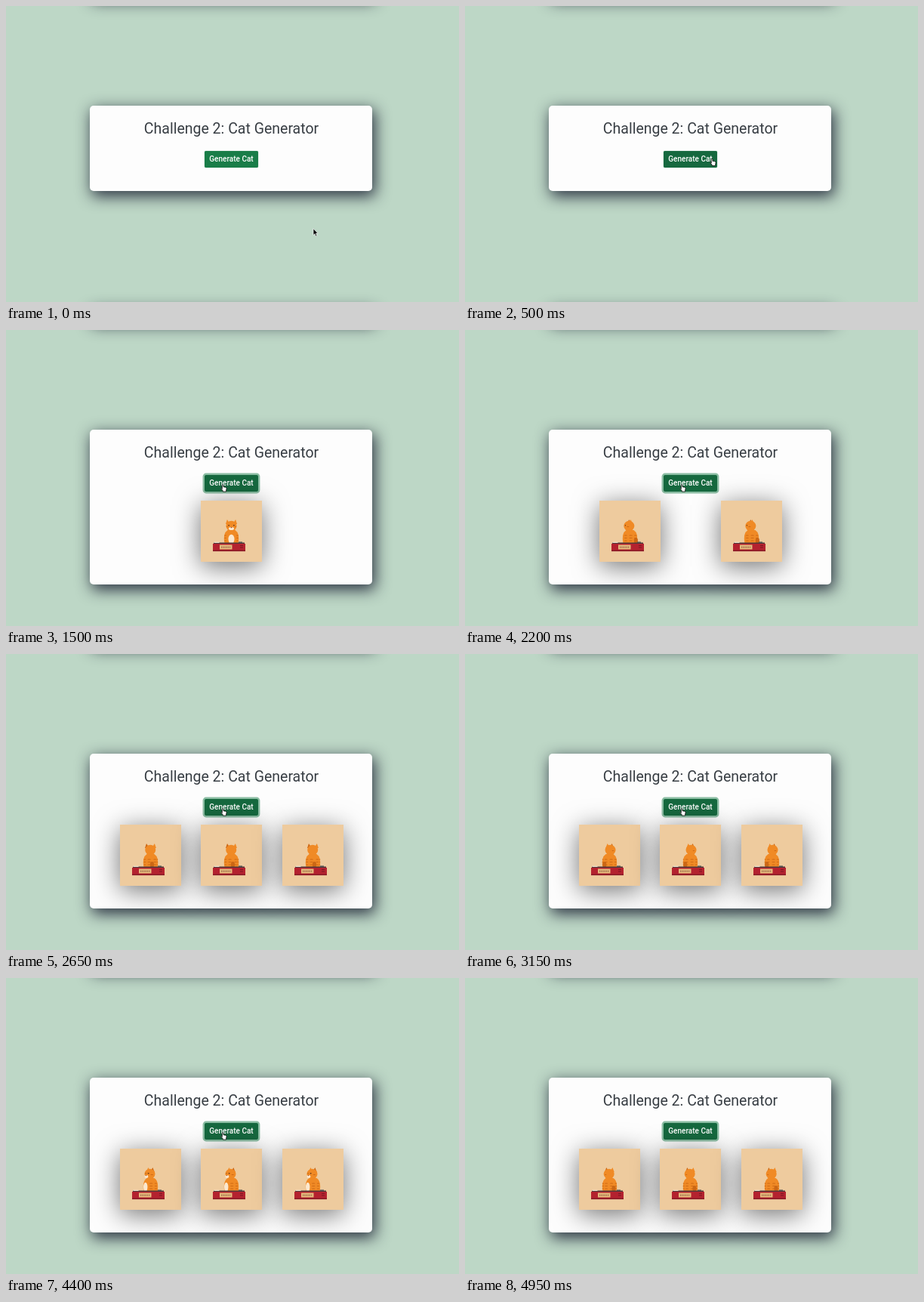
Animation, 600 px wide and 392 px high, one loop 5000 ms. Source, as an HTML page:

```html
<!DOCTYPE html>
<html lang="en">
<head>
<meta charset="utf-8">
<title>Cat Generator</title>
<style>
  html, body { margin: 0; width: 100%; height: 100%; overflow: hidden; background: #bdd7c6; }
  #stage { position: absolute; left: 0; top: 0; width: 600px; height: 392px; overflow: hidden; font-family: Roboto, sans-serif; }
  #stage > *, .tile { position: absolute; }
  .card { left: 111px; width: 374px; height: 113px; border-radius: 5px; background: #fdfdfd; box-shadow: 3px 6px 20px 1px rgba(34, 40, 58, .92); }
  #above { top: -126px; }
  #card { top: 132px; }
  #below { top: 398px; }
  #title { left: 111.5px; width: 374px; top: 151px; line-height: 24px; font-size: 19.5px; text-align: center; color: #383e44; white-space: nowrap; }
  #button { left: 263px; top: 192px; width: 71px; height: 22px; border-radius: 2px; background: #197d48; box-shadow: 0 0 1px #197d48; color: #fff; font-size: 10px; font-weight: 500; line-height: 22px; text-align: center; white-space: nowrap; }
  #button.hover { background: #16693f; }
  #button.focus { box-shadow: 0 0 0 2.4px #8bbda3; }
  .tile { top: 226px; width: 81px; height: 81px; background: #eecb9e; box-shadow: 0 6px 34px rgba(0, 0, 0, .55); }
  .tile svg { display: block; }
  #pointer { left: 0; top: 0; overflow: visible; }
</style>
</head>
<body>
<div id="stage">
  <div class="card" id="above"></div>
  <div class="card" id="below"></div>
  <div class="card" id="card"></div>
  <div id="title">Challenge 2: Cat Generator</div>
  <div id="button">Generate Cat</div>
  <div id="tiles"></div>
  <svg id="pointer" width="12" height="14">
    <path id="arrow" d="M.5 .3V9L2.5 7.2 3.9 10.4 5.4 9.7 4 6.6H6.7Z" fill="#000" stroke="#fff" stroke-width=".7"/>
    <path id="hand" d="M2.3 6.5V1.3Q3.2 0 4 1.3V4Q5 3.3 5.6 4.3 6.6 3.7 7 4.7 8.3 4.4 8.2 5.8L7.6 8.2V10H3.2V8.8L.6 6Q.8 4.8 2.3 6.5Z" fill="#fff" stroke="#111" stroke-width=".8"/>
  </svg>
</div>
<script>
const LOOP = 5000, FOCUS = 1350, HOVER = 350, TURN = 2500, FRONT = 1500;
const CLICKS = [1450, 1950, 2450];
const COLUMNS = [[], [258], [178, 339], [150.5, 258, 365.5]];
const ROUTE = [
  [0, 406.5, 294.5], [50, 406.5, 294.5], [400, 306, 206], [550, 330, 200], [800, 369, 167],
  [1050, 276, 205], [1150, 284, 204], [4500, 284, 204], [4850, 300, -20], [LOOP, 300, -20]
];
const ORANGE = '#f08a25', DARK = '#cb6715', CREAM = '#fbe8cf', MID = 40.5;
const $ = id => document.getElementById(id);

const oval = (x, y, rx, ry, fill) => `<ellipse cx="${x}" cy="${y}" rx="${rx}" ry="${ry}" fill="${fill}"/>`;
const box = (x, y, w, h, fill) => `<rect x="${x}" y="${y}" width="${w}" height="${h}" fill="${fill}"/>`;
const shape = (d, fill) => `<path d="${d}" fill="${fill}"/>`;

// A mark on the surface of the turning cat, hidden on its far side
function mark(angle, radius, y, rx, ry, fill) {
  const depth = Math.cos(angle);
  return depth > 0 ? oval(MID - radius * Math.sin(angle), y, rx * (.3 + .7 * depth), ry, fill) : '';
}

function cat(a) {
  const s = Math.sin(a), c = Math.cos(a), headX = MID - 1.2 * s;
  const tail = oval(MID + 8 * s, 53, 2.6, 4, DARK);
  const ear = side => {
    const x = headX + side * 4.6 * c + s;
    return shape(`M${x - 3} 31L${x + side * c} 25 ${x + 3} 31Z`, side * s > .2 ? DARK : ORANGE);
  };
  let stripes = '';
  for (const angle of [1.1, 1.9, 2.7, 3.6, 4.4, 5.2])
    for (const y of [46, 49.5, 53]) stripes += mark(a + angle, 9, y, 2.4, .6, DARK);
  return (c > 0 ? tail : '') +
    shape('M31.5 57Q29 43 35.5 39H45.5Q52 43 49.5 57Z', ORANGE) + stripes +
    mark(a, 8, 51, 4, 6.2, CREAM) + (c > 0 ? '' : tail) +
    ear(-1) + ear(1) + oval(headX, 33.5, 7, 6.8, ORANGE) +
    mark(a, 6.5, 37, 3.6, 2, CREAM) + mark(a, 7, 35.6, 1, .7, '#8b3c21') +
    mark(a - .55, 6.5, 32.8, 1.1, .7, '#5d3518') + mark(a + .55, 6.5, 32.8, 1.1, .7, '#5d3518') +
    mark(a - 1.3, 6, 34.5, 1.8, .5, DARK) + mark(a + 1.3, 6, 34.5, 1.8, .5, DARK);
}

function recordPlayer() {
  let dots = '';
  for (let x = 27; x < 40; x += 2.2) dots += box(x, 60.8, 1.2, 1.6, '#8d5740');
  return box(17, 55.5, 41, 2, '#51383a') + box(17.5, 54.7, 7, 1.3, '#eadfce') +
    box(16, 57, 43, 10, '#b4222f') + box(16, 65.5, 43, 1.6, '#8a1a27') +
    box(25, 58.5, 16.5, 6, '#e5b97c') + dots + box(50, 54.5, 5, 1.2, '#39424a') +
    box(52, 59, 4, 1, '#7d1722') + box(52, 61.5, 4, 1, '#7d1722');
}

function pointerAt(t) {
  const i = ROUTE.findIndex(p => p[0] > t);
  const [t0, x0, y0] = ROUTE[i - 1], [t1, x1, y1] = ROUTE[i];
  const u = (t - t0) / (t1 - t0), k = u * u * (3 - 2 * u);
  return [x0 + (x1 - x0) * k, y0 + (y1 - y0) * k];
}

const player = recordPlayer();
const tiles = CLICKS.map(() => {
  const tile = document.createElement('div');
  tile.className = 'tile';
  tile.innerHTML = `<svg width="81" height="81"><g></g>${player}</svg>`;
  $('tiles').append(tile);
  return tile;
});

function draw(t) {
  const columns = COLUMNS[CLICKS.filter(click => t >= click).length];
  const figure = columns.length ? cat((t - FRONT) / TURN * 2 * Math.PI) : '';
  tiles.forEach((tile, i) => {
    tile.style.display = i < columns.length ? '' : 'none';
    tile.style.left = columns[i] + 'px';
    tile.querySelector('g').innerHTML = figure;
  });
  $('card').style.height = columns.length ? '205px' : '113px';
  $('below').style.top = columns.length ? '490px' : '398px';
  $('button').className = (t >= HOVER ? 'hover ' : '') + (t >= FOCUS ? 'focus' : '');

  const [x, y] = pointerAt(t);
  const onButton = x > 263 && x < 334 && y > 191 && y < 214;
  $('pointer').style.transform = `translate(${x}px, ${y}px)`;
  $('hand').style.display = onButton ? '' : 'none';
  $('arrow').style.display = onButton ? 'none' : '';
}

const start = performance.now();
function tick() {
  draw((performance.now() - start) % LOOP);
  requestAnimationFrame(tick);
}
tick();
</script>
</body>
</html>
```
